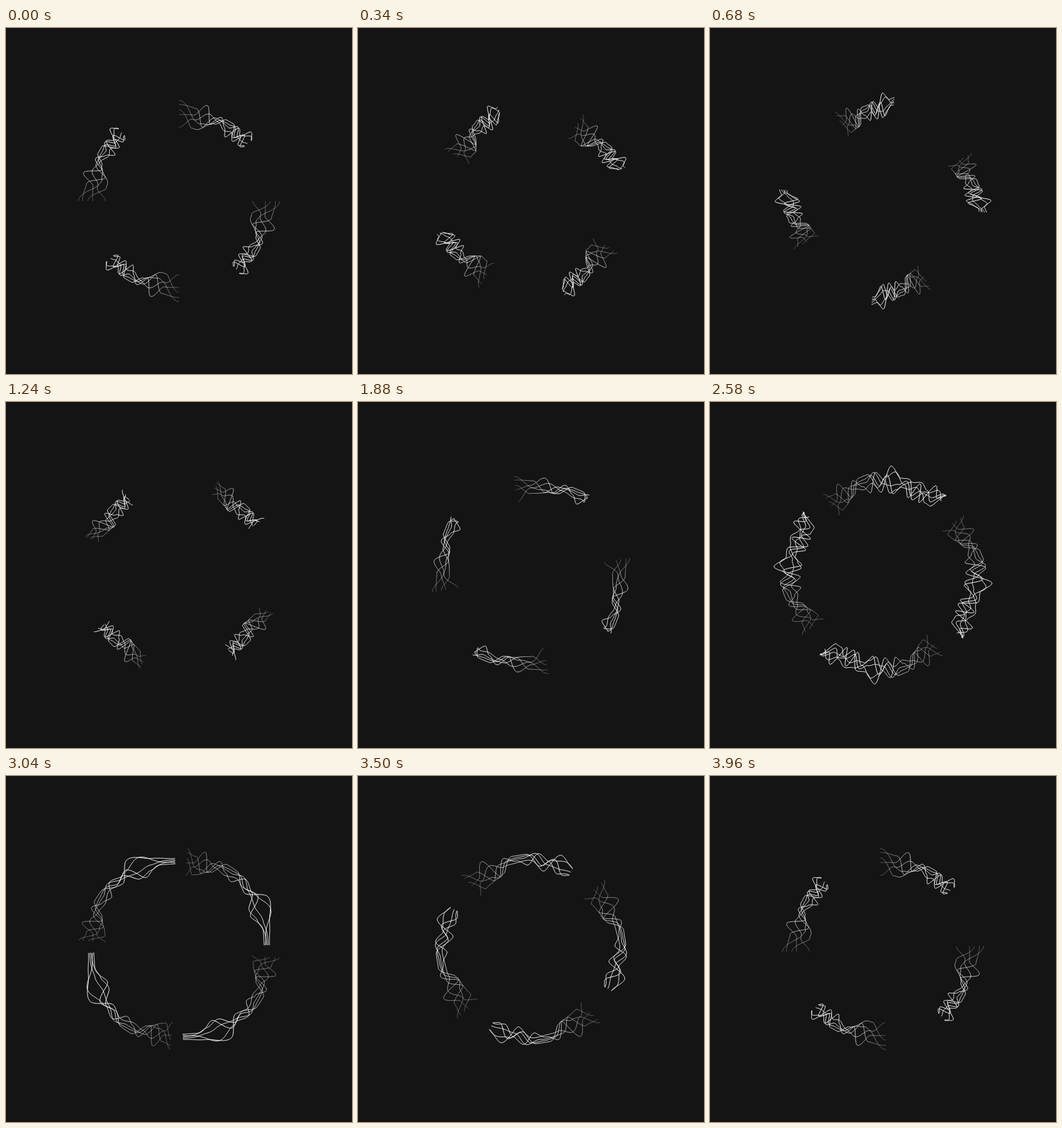
An HTML page that plays this animation: 540 by 540 pixels, repeating every 3.98 s.

```html
<!DOCTYPE html>
<html lang="en">
<head>
<meta charset="utf-8">
<title>Orbiting strands</title>
<style>
  html, body { margin: 0; width: 100%; height: 100%; overflow: hidden; background: #141414; }
  svg { display: block; width: 100vw; height: 100vh; }
</style>
</head>
<body>
<svg viewBox="-270 -270 540 540">
  <defs><g id="strand" fill="none" stroke="#fff" stroke-width="1" stroke-linejoin="round"></g></defs>
  <use href="#strand"/>
  <use href="#strand" transform="rotate(90)"/>
  <use href="#strand" transform="rotate(180)"/>
  <use href="#strand" transform="rotate(270)"/>
</svg>
<script>
const LOOP = 3980, STEP = 20;
const SLICES = 24, POINTS = 12;
const LANES = [1, 0.7, 0.3, -0.05, -1];

// centre and spread: radii at even stations from tail to head
// wave: linear and quadratic wiggle density along the strand
const POSES = [
  { at: 0,    centre: [136, 137, 142, 139, 142], spread: [21, 21, 9, 15, 14],  wave: [4, 5] },
  { at: 680,  centre: [136, 140, 143, 148, 155], spread: [21, 17, 14, 20, 14], wave: [9, 1] },
  { at: 1240, centre: [147, 146, 143, 143, 145], spread: [11, 14, 16, 14, 14], wave: [6, 2] },
  { at: 1880, centre: [136, 141, 143, 146, 146], spread: [20, 13, 10, 10, 14], wave: [4, 2] },
  { at: 2580, centre: [136, 148, 150, 144, 146], spread: [20, 14, 21, 18, 14], wave: [14, 1] },
  { at: 3040, centre: [136, 145, 145, 143, 136], spread: [21, 13, 10, 20, 10], wave: [16, -6] }
];

const group = document.getElementById("strand");
const paths = Array.from({ length: SLICES }, (_, i) => {
  const path = document.createElementNS("http://www.w3.org/2000/svg", "path");
  path.setAttribute("opacity", Math.min(1, 0.25 + 1.3 * (i + 0.5) / SLICES));
  return group.appendChild(path);
});

const mix = (a, b, k) => a + (b - a) * k;
const ease = k => k * k * (3 - 2 * k);

function random(line, cell) {
  const n = Math.sin(line * 311.7 + cell * 127.1 + 4.2) * 43758.5453;
  return 2.3 * (n - Math.floor(n)) - 1.15;
}

function wiggle(line, phase) {
  const cell = Math.floor(phase);
  const value = c => c === 0 ? LANES[line] : random(line, c);
  return mix(value(cell), value(cell + 1), ease(phase - cell));
}

function station(list, u) {
  const x = u * (list.length - 1);
  const i = Math.min(Math.floor(x), list.length - 2);
  return mix(list[i], list[i + 1], ease(x - i));
}

// Pose by index, wrapping round the loop
function pose(i) {
  const n = POSES.length, turn = Math.floor(i / n), p = POSES[i - turn * n];
  return { ...p, at: p.at + turn * LOOP };
}

// Smooth periodic curve through the poses
function poseAt(time) {
  let i = POSES.length - 1;
  while (POSES[i].at > time) i--;
  const [a, b, c, d] = [i - 1, i, i + 1, i + 2].map(pose);
  const span = c.at - b.at, k = (time - b.at) / span;
  const blend = key => b[key].map((v, j) => {
    const m0 = (c[key][j] - a[key][j]) / (c.at - a.at) * span;
    const m1 = (d[key][j] - b[key][j]) / (d.at - b.at) * span;
    return mix(v, c[key][j], ease(k)) + m0 * k * (1 - k) ** 2 - m1 * k * k * (1 - k);
  });
  return { centre: blend("centre"), spread: blend("spread"), wave: blend("wave") };
}

function draw(time) {
  const turn = 2 * Math.PI * time / LOOP;
  const s = Math.sin(turn);
  const length = (50.2 - 24.5 * s + 8 * s * s) * Math.PI / 180;
  const { centre, spread, wave } = poseAt(time);

  const point = (line, u) => {
    const phase = (wave[0] * u + wave[1] * u * u) * (0.88 + 0.06 * line);
    const r = station(centre, u) + station(spread, u) * wiggle(line, phase);
    const angle = turn + length * u;
    return (r * Math.sin(angle)).toFixed(2) + " " + (-r * Math.cos(angle)).toFixed(2);
  };

  paths.forEach((path, slice) => {
    const lines = LANES.map((_, line) => {
      const run = [];
      for (let p = 0; p <= POINTS; p++) run.push(point(line, (slice + p / POINTS) / SLICES));
      return "M" + run.join("L");
    });
    path.setAttribute("d", lines.join(""));
  });
}

const start = performance.now();
function tick() {
  const time = (performance.now() - start) % LOOP;
  draw(Math.floor(time / STEP) * STEP);
  requestAnimationFrame(tick);
}
tick();
</script>
</body>
</html>
```
